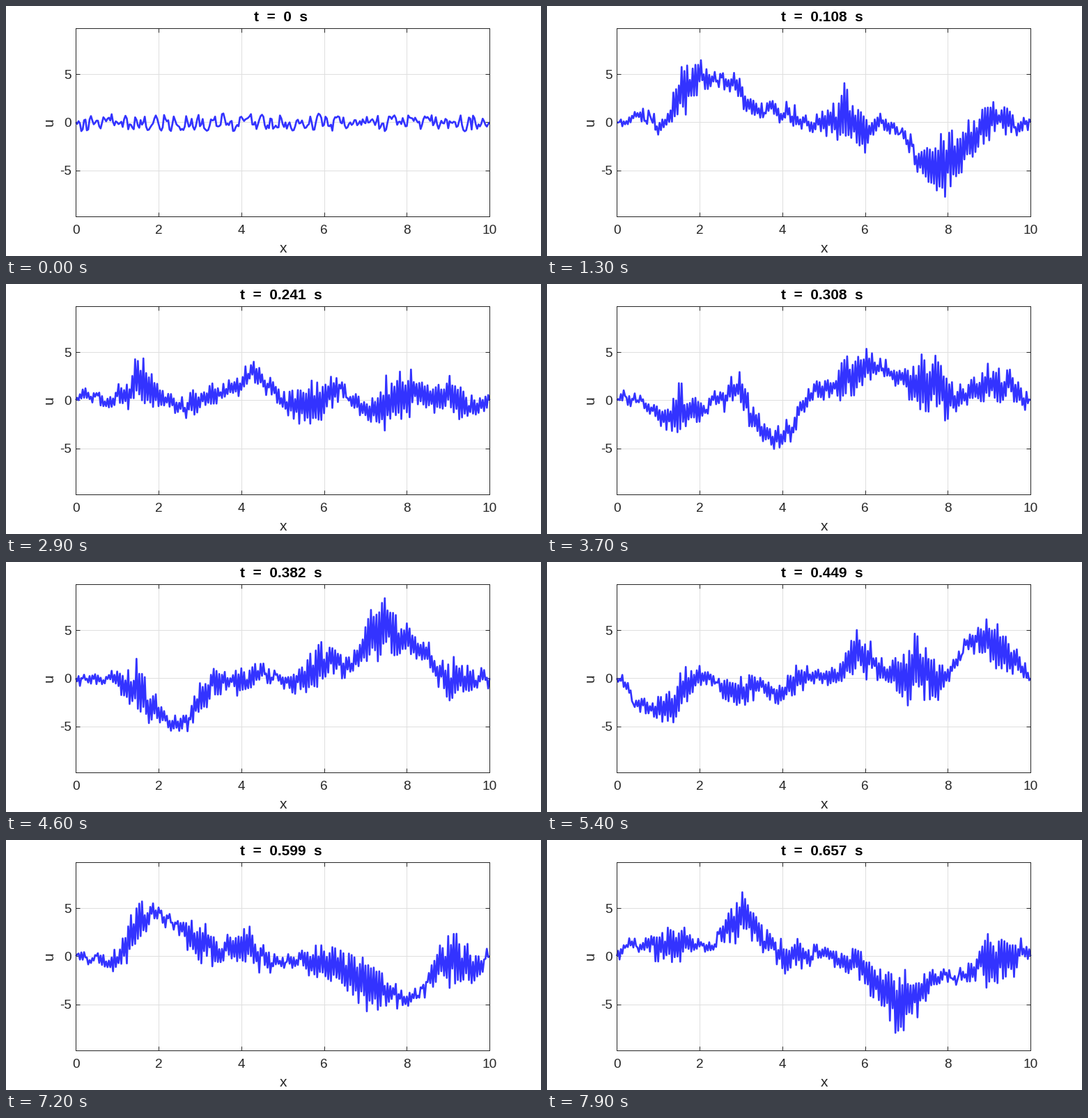
A matplotlib script for the animation above (8 s loop, 768 px wide and 360 px high).

```python
import numpy as np
import matplotlib.pyplot as plt
from matplotlib.animation import FuncAnimation

W, H, DPI = 768, 360, 100
PX = 72 / DPI
LEFT, RIGHT, TOP, BOTTOM = 100.2, 694.2, 31.8, 302.8
LENGTH, SPEED, CELLS = 10, 20, 300
FRAMES, STEP = 80, 0.0083127
YMAX = 9.78

plt.rcParams["font.family"] = "Liberation Sans"

# Turning points of the travelling profile (position, height)
PROFILE = np.array([
    (0, 0), (0.4, 0.6), (0.7, 1.5), (1, 3.2), (1.6, 3.1), (2, 4.3), (2.6, 4.2),
    (3.3, 2.7), (3.7, 4.4), (4.4, 4.6), (5.1, 5.6), (5.6, 4.4), (6.4, 5),
    (7.2, 3.5), (7.6, 3.8), (8, 3.2), (8.6, 4.3), (9.1, 4.1), (9.5, 1.4), (10, 0.1),
])

# Slow sawtooth packets: centre and height from first to last, width
PACKETS = [
    ((8.25, 6.85), (2.3, 2.3), 0.42),
    ((1.8, 1.3), (1.7, 1.4), 0.3),
    ((5.6, 5.9), (2.2, 0.9), 0.38),
    ((3, 3.1), (0.3, 1.4), 0.35),
    ((9.1, 9.2), (0.7, 2), 0.38),
    ((4.2, 4.2), (0.1, 1.2), 0.3),
]

x = np.linspace(0, LENGTH, CELLS + 1)
node = np.arange(CELLS + 1)
rng = np.random.default_rng(11)

start = np.interp(x, np.linspace(0, LENGTH, 230), rng.uniform(-1, 1, 230))
start[[0, -1]] = 0
ripple = np.concatenate([start, -start[-2:0:-1]])
jitter = rng.uniform(0.4, 1.3, 2 * CELLS)


def profile(s):
    """Even profile, periodic over twice the string."""
    s = LENGTH - np.abs(LENGTH - s % (2 * LENGTH))
    return np.interp(s, *PROFILE.T)


def around(values, shift):
    return values[(node + shift) % len(values)]


def sawtooth(n):
    f = n / (FRAMES - 1)
    height = np.full_like(x, 0.35)
    for (c0, c1), (h0, h1), width in PACKETS:
        centre = c0 + (c1 - c0) * f
        height += (h0 + (h1 - h0) * f) * np.exp(-((x - centre) / width) ** 2 / 2)
    return min(1, n / 10) * height * (-1.0) ** (node + n) * around(jitter, 5 * n)


def string(n):
    shift = SPEED * STEP * n
    u = profile(shift + x) - profile(shift - x)
    u += (around(ripple, 5 * n) + around(ripple, -5 * n)) / 2
    u += sawtooth(n)
    u[[0, -1]] = 0
    return u


fig = plt.figure(figsize=(W / DPI, H / DPI), dpi=DPI, facecolor="white")
ax = fig.add_axes([LEFT / W, 1 - BOTTOM / H, (RIGHT - LEFT) / W, (BOTTOM - TOP) / H])
ax.set(xlim=(0, LENGTH), ylim=(-YMAX, YMAX),
       xticks=range(0, 11, 2), yticks=(-5, 0, 5))
ax.set_axisbelow(True)
ax.grid(color="#dfdfdf", lw=PX)
ax.tick_params(direction="in", length=6 * PX, width=PX, color="#262626",
               top=True, right=True, labelbottom=False, labelleft=False)
for side in ax.spines.values():
    side.set(color="#262626", linewidth=PX)


def put(px, py, s, size=19, color="#262626", ha="center", va="baseline", **kw):
    return fig.text(px / W, 1 - py / H, s, fontsize=size * PX, color=color,
                    ha=ha, va=va, **kw)


for v in range(0, 11, 2):
    put(LEFT + v / LENGTH * (RIGHT - LEFT), 328, str(v))
for v in (-5, 0, 5):
    put(93.5, 174 - v * (BOTTOM - TOP) / (2 * YMAX), str(v), ha="right")
put(398, 355, "x", 20.9)
put(62, 167, "u", 20.9, rotation=90, va="center")
title = put(395, 22, "", 20.9, "black", weight="bold")

line, = ax.plot(x, string(0), color="#3333ff", lw=2.67 * PX, clip_on=False,
                solid_joinstyle="round", solid_capstyle="butt")


def draw(n):
    line.set_ydata(string(n))
    title.set_text(f"t  =  {n * STEP:.3g}  s")
    return line, title


anim = FuncAnimation(fig, draw, frames=FRAMES, interval=100, repeat=True,
                     repeat_delay=0, blit=False)
plt.show()
```
